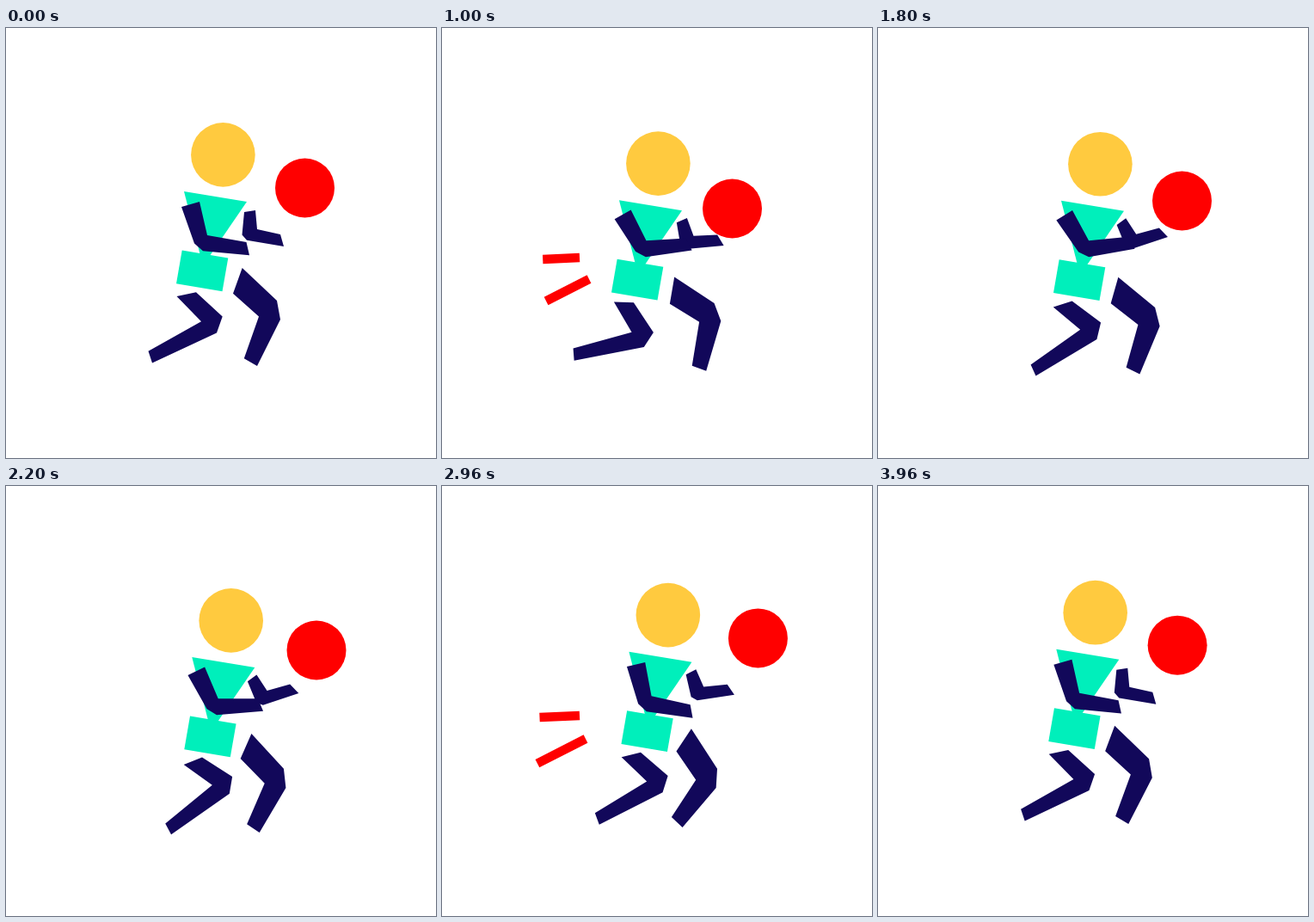
An HTML page for the animation above (4 s loop, 500 px wide and 500 px high).

```html
<!DOCTYPE html>
<html lang="en">
<head>
<meta charset="utf-8">
<title>Ball player</title>
<style>
  html, body { margin: 0; width: 100%; height: 100%; overflow: hidden; background: #fff; }
  svg { display: block; width: 100%; height: 100%; }
  .limb { fill: #12085a; }
  .suit { fill: #00efbb; }
  .skin { fill: #ffca3f; }
  .ball { fill: #f00; }
  .dash { stroke: #f00; stroke-width: 10.5; }
</style>
</head>
<body>
<svg viewBox="0 0 500 500">
  <line id="dash1" class="dash"/>
  <line id="dash2" class="dash"/>
  <circle id="ball" class="ball" r="34.5"/>
  <g id="body">
    <circle class="skin" cx="252.4" cy="147.4" r="37.3"/>
    <polygon class="suit" points="207,190 280,202 229,276.5"/>
    <polygon class="suit" points="204.7,258.5 258.3,267.5 251.5,306.3 198,297.2"/>
    <polygon id="backLeg" class="limb" points="198.5,312 221,307.3 251.7,335.5 245,354.5 170,389.5 165.5,375.8 227,341.2"/>
    <polygon id="frontLeg" class="limb" points="274.7,279 315,317 319,339 292,393 276.8,384.3 294,335.5 264,308.7"/>
    <polygon id="farArm" class="limb" points="277,214 290,212 292,234 319,240 323,254 280,246.7 274.5,240.5"/>
    <polygon id="nearArm" class="limb" points="204,208 225,202 234,241 279.5,249 283,264.3 229,259.3 219,250.5"/>
  </g>
</svg>
<script>
const LOOP = 4000, STEP = 40;
const TIMES = [0, 360, 1000, 1800, 2200, 2560, 2820, 3360];
const TRACKS = {
  bodyX: [0, -1.3, -1, 6, 9.3, 11, 11, 7.3],
  bodyY: [0, 3.7, 10.2, 10.8, 9, 7, 4, 0.3],
  ballX: [347.5, 342, 337.5, 353.5, 361, 365, 368.5, 358],
  ballY: [186, 194, 210, 201, 191, 184, 179, 174.5],
  farArm: [0, -4.8, -15, -27.8, -28, -24, -20.5, -12],
  nearArm: [0, -4.8, -13.5, -15.5, -10, -3, 1, 4],
  backLeg: [0, 5.3, 13.9, -6, -10, -5.6, -3, 0],
  frontLeg: [0, -4, -10.1, -3.9, 4, 10.8, 13, 13.4]
};
const PIVOTS = {
  farArm: [283, 227],
  nearArm: [220, 220],
  backLeg: [215, 320],
  frontLeg: [275, 299]
};
const BURSTS = [[770, 1790], [2280, 3300]];
const BURST_EASE = 320;

const $ = id => document.getElementById(id);
const set = (id, attrs) => {
  for (const key in attrs) $(id).setAttribute(key, attrs[key]);
};
const clamp = v => Math.min(1, Math.max(0, v));
const smooth = p => p * p * (3 - 2 * p);

// Key time and value with the index wrapped around the loop
const count = TIMES.length;
const wrap = i => (i + count) % count;
const keyTime = i => TIMES[wrap(i)] + Math.floor(i / count) * LOOP;
const span = i => keyTime(i + 1) - keyTime(i);
const rate = (v, i) => (v[wrap(i + 1)] - v[wrap(i)]) / span(i);

function tangent(v, i) {
  const before = span(i - 1), after = span(i);
  return (rate(v, i - 1) * after + rate(v, i) * before) / (before + after);
}

// Periodic cubic Hermite curve
function sample(name, t) {
  const v = TRACKS[name];
  let i = count - 1;
  while (TIMES[i] > t) i--;
  const h = span(i), u = (t - TIMES[i]) / h, w = 1 - u;
  return v[i] * smooth(w) + v[wrap(i + 1)] * smooth(u) +
    h * u * w * (tangent(v, i) * w - tangent(v, i + 1) * u);
}

function drawDashes(t) {
  const burst = BURSTS.find(([from, to]) => t > from && t < to);
  const visibility = burst ? "visible" : "hidden";
  set("dash1", { visibility });
  set("dash2", { visibility });
  if (!burst) return;

  const s = smooth(clamp(Math.min(t - burst[0], burst[1] - t) / BURST_EASE));
  const place = (id, right, left, y, slope) => set(id, {
    x1: right, y1: y(right, slope), x2: left, y2: y(left, slope)
  });
  place("dash1", 160, 160 - Math.min(53 * s, 46.5), (x, k) => 267 + (160 - x) * k, 0.045);
  place("dash2", 174 - 7 * s ** 4, 173.4 - Math.min(64.8 * s, 62.5),
    (x, k) => 292 + (171 - x) * k, 0.51);
}

function draw(t) {
  set("body", { transform: `translate(${sample("bodyX", t)} ${sample("bodyY", t)})` });
  set("ball", { cx: sample("ballX", t), cy: sample("ballY", t) });
  for (const id in PIVOTS) {
    set(id, { transform: `rotate(${sample(id, t)} ${PIVOTS[id].join(" ")})` });
  }
  drawDashes(t);
}

const start = performance.now();
function tick() {
  const t = (performance.now() - start) % LOOP;
  draw(Math.floor(t / STEP) * STEP);
  requestAnimationFrame(tick);
}
tick();
</script>
</body>
</html>
```
